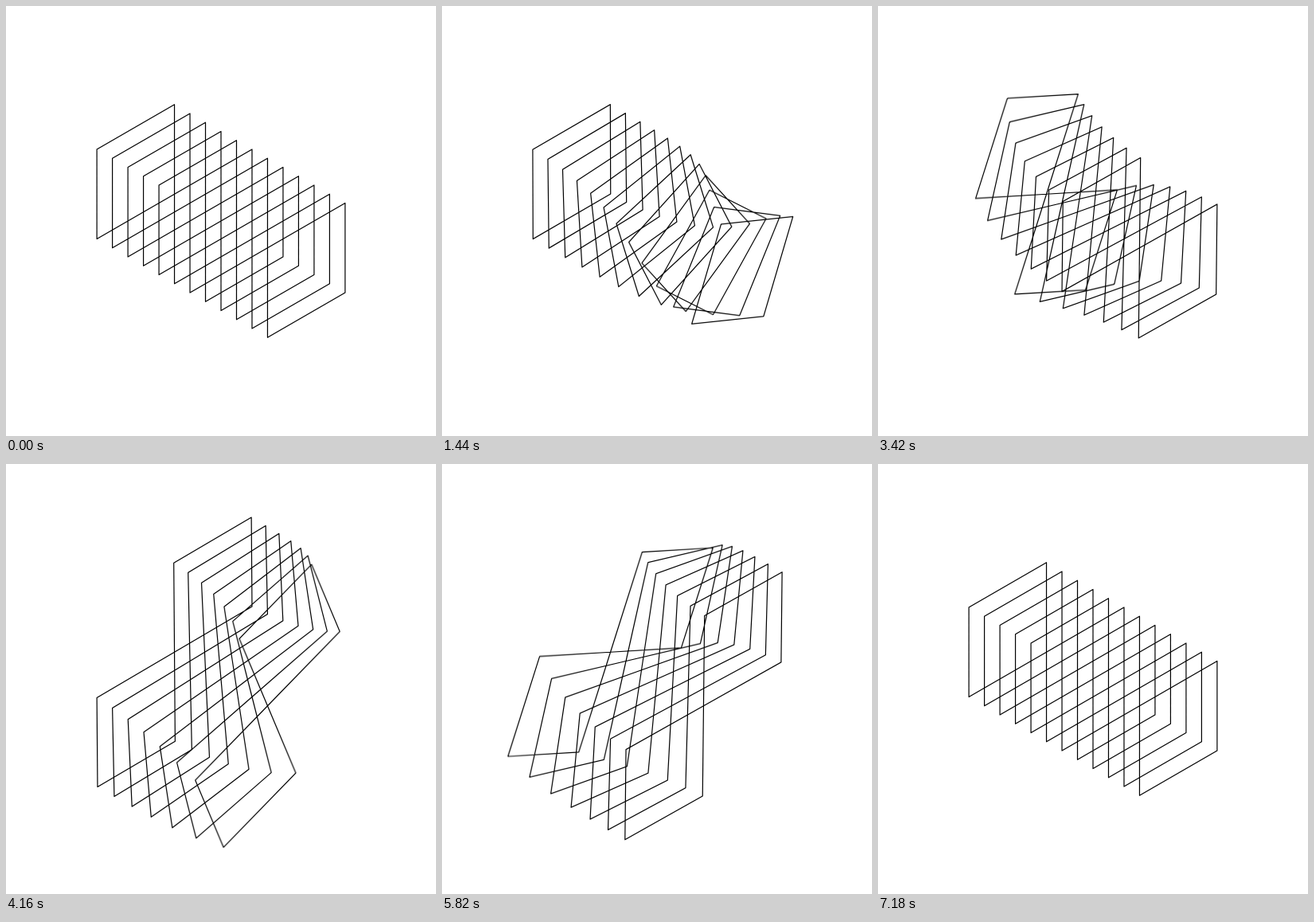
Animation, 540 px wide and 540 px high, one loop 7200 ms. Source, as an HTML page with a canvas:

```html
<!DOCTYPE html>
<html>
<head>
<meta charset="utf-8">
<style>
html, body { margin: 0; width: 100%; height: 100%; overflow: hidden; background: #fff; }
canvas { display: block; }
</style>
</head>
<body>
<canvas id="stage" width="540" height="540"></canvas>
<script>
const ctx = document.getElementById('stage').getContext('2d');
const PHASE = 2400, TURN = 1600, DELAY = (PHASE - TURN) / 11;
const SIDE = 112.5, COS30 = Math.sqrt(3) / 2;
const SAMPLES = 4, SHUTTER = 8;

function ease(p) {
  p = Math.min(1, Math.max(0, p));
  const g = 3.25;
  return p < 0.5 ? (2 * p) ** g / 2 : 1 - (2 - 2 * p) ** g / 2;
}

// Adds a square centred at (u, v) in its sheet; the sheet is turned by angle
// and pushed along the depth axis (all lengths in square sides).
function square(u, v, angle, depth) {
  const c = Math.cos(angle), s = Math.sin(angle);
  for (const [du, dv] of [[-.5, -.5], [.5, -.5], [.5, .5], [-.5, .5]]) {
    const a = u + du, b = v + dv;
    const x = a * c - b * s, y = a * s + b * c;
    ctx.lineTo(270 + SIDE * COS30 * (x + depth),
               270 + SIDE * (y + (depth - x) / 2));
  }
  ctx.closePath();
}

function trace(time) {
  const phase = Math.floor(time / PHASE) % 3, t = time % PHASE;
  const angle = slot => ease((t - slot * DELAY) / TURN) * Math.PI / 2;
  ctx.beginPath();
  if (phase === 0) {
    for (let k = 0; k < 12; k++) addSquare(0, 0, angle(k), (k - 5.5) / 5);
  } else {
    // Seven sheets, each holding two squares that touch at a corner.
    const v = phase === 1 ? .5 : -.5;
    for (let k = 0; k < 7; k++) {
      const a = angle(k + 5), depth = (k - 3) / 5;
      addSquare(.5, v, a, depth);
      addSquare(-.5, -v, a, depth);
    }
  }
  ctx.stroke();
}

function addSquare(u, v, angle, depth) {
  const c = Math.cos(angle), s = Math.sin(angle);
  const a = u - .5, b = v - .5, x = a * c - b * s, y = a * s + b * c;
  ctx.moveTo(270 + SIDE * COS30 * (x + depth), 270 + SIDE * (y + (depth - x) / 2));
  square(u, v, angle, depth);
}

ctx.lineWidth = 1.2;
ctx.lineJoin = 'round';
ctx.strokeStyle = '#000';
ctx.globalCompositeOperation = 'lighter';
ctx.globalAlpha = 1 / SAMPLES;

// Motion blur: the alpha of several close moments adds up to full black.
function draw() {
  const now = performance.now() % (3 * PHASE);
  ctx.clearRect(0, 0, 540, 540);
  for (let i = 0; i < SAMPLES; i++) trace(now + i * SHUTTER / SAMPLES);
  requestAnimationFrame(draw);
}
draw();
</script>
</body>
</html>
```
